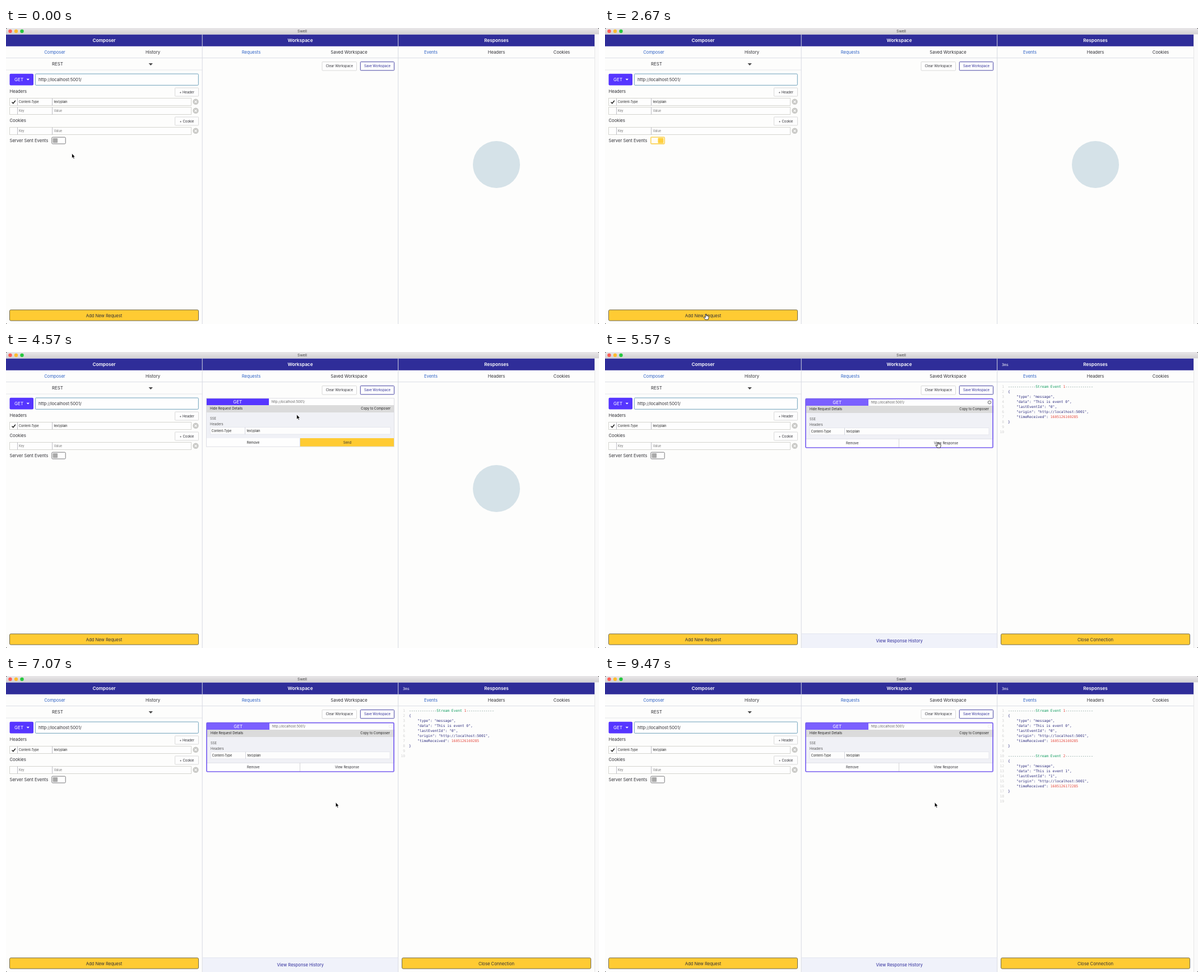
Recreate the animation shown at these times as an HTML page. Size 1058 by 529 pixels, loop 9540 ms.

```html
<!DOCTYPE html>
<html lang="en">
<head>
<meta charset="utf-8">
<title>Swell</title>
<style>
html, body { margin: 0; width: 100%; height: 100%; overflow: hidden; background: #fdfdfc; }
svg { display: block; width: 1058px; height: 529px; }
text { font-family: Inter, Roboto, sans-serif; white-space: pre; }
.code text { font-family: "DejaVu Sans Mono", monospace; }
</style>
</head>
<body>
<svg id="stage" viewBox="0 0 1058 529" xmlns="http://www.w3.org/2000/svg"></svg>
<script>
const LOOP = 9540;
const T = { toggle: 1400, add: 2700, expand: 4000, open: 5500, second: 8500, blur: 4000 };
const BODY = 7.65, SMALL = 5.95, CELL = 5.5, MONO = 6.31;
const INK = '#303036', NAVY = '#2f2d99', YELLOW = '#ffcb33', PURPLE = '#5636ff', GREY = '#d4d4cf';

const rect = (x, y, w, h, fill, stroke = 'none', r = 0, sw = 1) =>
  `<rect x="${x}" y="${y}" width="${w}" height="${h}" rx="${r}" fill="${fill}" stroke="${stroke}" stroke-width="${sw}"/>`;
const line = (x1, y1, x2, y2, stroke = '#dcdfe6') =>
  `<path d="M${x1} ${y1}L${x2} ${y2}" stroke="${stroke}"/>`;
// y is the middle of the capitals
const text = (s, x, y, size = BODY, fill = INK, anchor = 'start', weight = 400) =>
  `<text x="${x}" y="${y + size * 0.36}" font-size="${size}" fill="${fill}" text-anchor="${anchor}" font-weight="${weight}">${s}</text>`;
const mid = (s, x, y, size, fill, weight) => text(s, x, y, size, fill, 'middle', weight);
const group = (id, body, extra = '') => `<g id="${id}" ${extra}>${body}</g>`;

function frame() {
  const lights = ['#ff5f57', '#febc2e', '#28c840']
    .map((c, i) => `<circle cx="${7.5 + 10.5 * i}" cy="5.8" r="3.2" fill="${c}"/>`).join('');
  const heads = [['Composer', 175], ['Workspace', 525], ['Responses', 875]]
    .map(([s, x]) => mid(s, x, 22, 8.2, '#fff', 600)).join('');
  const tabs = [['Composer', 87, 1], ['History', 262], ['Requests', 437.5, 1], ['Saved Workspace', 612],
    ['Events', 758, 1], ['Headers', 875], ['Cookies', 991.5]]
    .map(([s, x, on]) => mid(s, x, 43.5, BODY, on ? '#2f63c6' : INK)).join('');
  return rect(0, 0, 1058, 529, '#fdfdfc') +
    rect(0, 0, 1058, 11.5, 'url(#bar)') + lights + mid('Swell', 528.5, 6, 6.7, '#444') +
    rect(0, 11.7, 1050, 21, NAVY) + heads + tabs +
    line(0, 53.5, 1050, 53.5) + line(0, 75, 350, 75, '#e4e6ea') +
    line(350.2, 11.5, 350.2, 529, '#d5d8e2') + line(699.7, 11.5, 699.7, 529, '#d5d8e2') +
    rect(1050, 11.5, 8, 517.5, '#fafafa') + line(1050.5, 11.5, 1050.5, 529, '#e6e6e6');
}

const smallButton = (s, y) =>
  rect(301.5, y, 42, 15, '#fdfdfd', '#dadada', 1) + mid(s, 322.5, y + 7.5, 6);

function row(y, key, value, checked) {
  const ink = checked ? '#222' : '#777';
  return rect(6.5, y, 324, 13, '#fefefe', GREY) +
    line(20.5, y, 20.5, y + 13, '#bdbdc4') + line(82.5, y, 82.5, y + 13, '#bdbdc4') +
    (checked ? `<path d="M10.6 ${y + 7}l2.2 2.2l4 -5" fill="none" stroke="#111" stroke-width="1.4"/>` : '') +
    text(key, 23, y + 6.6, CELL, ink) + text(value, 85.5, y + 6.6, CELL, ink) +
    `<circle cx="338.5" cy="${y + 6.3}" r="5.2" fill="#c9c9c6"/>` +
    `<path d="M336.5 ${y + 4.3}l4 4m0 -4l-4 4" stroke="#fff" stroke-width="1.1"/>`;
}

const bigButton = (s, x, w) =>
  rect(x, 503.8, w, 19.3, YELLOW, '#6f6a52', 2) + mid(s, x + w / 2, 514.3);

function composer() {
  return text('REST', 82, 64.5, 7.8) + '<path d="M254.5 63h7.4l-3.7 4z" fill="#4a4a4a"/>' +
    rect(6.5, 81.7, 42.5, 20.8, PURPLE, 'none', 2) + text('GET', 15, 92, 8.1, '#fff') +
    '<path d="M36.5 90.7h5.4l-2.7 2.9z" fill="#fff"/>' +
    rect(52.3, 82, 291, 20.3, '#fefefe', '#6da0bb', 1.5) + text('http://localhost:5001/', 58, 92) +
    text('Headers', 6.5, 113.5) + smallButton('+ Header', 107) +
    row(125.5, 'Content-Type', 'text/plain', true) +
    group('blankRow', row(141.5, 'Key', 'Value')) +
    group('lower',
      text('Cookies', 6.5, 165.5) + smallButton('+ Cookie', 159) + row(177.5, 'Key', 'Value') +
      text('Server Sent Events', 6.5, 201.3) +
      group('off', rect(81.8, 195.2, 24.4, 11.8, '#fefefe', '#77777a', 1.5) + rect(83.5, 197, 8.6, 8.2, '#a9a9a9', 'none', 1)) +
      group('on', rect(81.8, 195.2, 24.4, 11.8, '#fffdf4', '#fbd76a', 1.5, 1.8) + rect(94.5, 196.5, 9.8, 9.2, '#ffd03e', 'none', 1))) +
    bigButton('Add New Request', 6.5, 337) +
    group('focus', rect(6.3, 503.8, 337.4, 19.4, 'none', '#5c7fae', 2, 1.6));
}

const cardTop = (fill) =>
  rect(357, 83, 112, 12, fill) + mid('GET', 413.3, 89, 8.1, '#fff') +
  rect(469, 83, 223.5, 12, '#fefefe') + text('http://localhost:5001/', 473.5, 88.8, SMALL, '#666') +
  rect(357, 95, 335.5, 13, '#dbdbdb');

const cardButtons = (y, name, fill) =>
  rect(357, y, 335.5, 15, '#fefefe') + rect(524.5, y, 168, 15, fill) +
  line(524.5, y, 524.5, y + 15, '#d5d5d8') +
  mid('Remove', 441, y + 7.5, SMALL, '#222') + mid(name, 609, y + 7.5, SMALL, '#333');

const details = (inset) =>
  text('Hide Request Details', 364, 101.3, SMALL, '#222') +
  text('Copy to Composer', 686 - inset * 2, 101.3, SMALL, '#222', 'end') +
  rect(357, 108, 335.5, 46, '#f0f1f6') +
  text('SSE', 364, 119.2, SMALL, '#555') + text('Headers', 364, 128.8, SMALL, '#555') +
  rect(364.5, 134.5, 321.5 - inset * 2, 12.5, '#fdfdfd', '#e6e7ee') +
  line(426.5, 134.5, 426.5, 147, '#d5d6de') +
  text('Content-Type', 366.7, 140.8, CELL, '#222') + text('text/plain', 429.5, 140.8, CELL, '#222');

function workspace() {
  const edge = (h) => rect(357.5, 82.7, 335, h, 'none', '#dedee4');
  return rect(564, 60.5, 61.5, 15.5, '#fefefe', '#d8d8d8', 1) + mid('Clear Workspace', 594.8, 68.3, SMALL) +
    rect(632.3, 60.5, 60.2, 15.3, '#fefefe', '#4a48a6', 1) + mid('Save Workspace', 662.5, 68.3, SMALL, NAVY) +
    group('folded', cardTop(PURPLE) + text('View Request Details', 364, 101.3, SMALL, '#222') +
      cardButtons(108, 'Send', YELLOW) + edge(40.7)) +
    group('unfolded', cardTop(PURPLE) + details(0) + cardButtons(154, 'Send', YELLOW) + edge(86.5)) +
    group('live',
      `<g transform="translate(1 1)">${cardTop('#7b60ff') + details(1)}</g>` +
      rect(357.5, 155, 335, 16, '#fefefe') + line(358, 155.3, 692, 155.3, '#dedee6') +
      line(524.5, 155, 524.5, 171, '#d5d5d8') +
      mid('Remove', 441.3, 163, SMALL) + mid('View Response', 608.5, 163, SMALL) +
      '<circle id="pulse" cx="686" cy="90" r="2.8" fill="none" stroke="#63636b" stroke-width="1"/>' +
      rect(358, 83.7, 334, 87.3, 'none', '#785ff0', 1.5, 1.7) +
      rect(351, 503.5, 348, 25.5, '#f0f2fa') + line(351, 503.5, 699, 503.5, '#e3e6f0') +
      mid('View Response History', 525.2, 516.6, BODY, '#2f2d9c'));
}

const span = (s, fill) => `<tspan fill="${fill}">${s}</tspan>`;

function streamEvent(n, stamp) {
  const dash = span('-'.repeat(13), '#3f6a62'), red = '#e5473c';
  const body = [
    dash + span('Stream Event ', '#0c9a5c') + span(n + 1, red) + dash,
    '{',
    '    "type": "message",',
    `    "data": "This is event ${n}",`,
    `    "lastEventId": "${n}",`,
    '    "origin": "http://localhost:5001",',
    '    "timeReceived": ' + span(stamp, red),
    '}'
  ];
  return body.map((s, i) => text(s, 719, 61.3 + 9 * (i + 9 * n), MONO, '#29297c')).join('');
}

const lineNumbers = (from, to) => Array.from({ length: to - from + 1 }, (_, i) =>
  text(from + i, 712, 61.3 + 9 * (from + i - 1), MONO, '#d0d0d0', 'end')).join('');

function responses() {
  return group('logo', '<circle cx="875" cy="244" r="42" fill="#d5e2e8"/>') +
    group('result',
      text('3ms', 708, 22.3, 6.6, '#fff') + lineNumbers(1, 10) + streamEvent(0, 1605126169285) +
      group('more', lineNumbers(11, 19) + streamEvent(1, 1605126172285)), 'class="code"') +
    group('close', bigButton('Close Connection', 706.5, 337));
}

const pointer =
  group('arrow', '<path d="M0 0V8.6L1.9 6.9L3.2 9.9L4.7 9.3L3.4 6.4H5.8Z" fill="#000" stroke="#fff" stroke-width=".7"/>') +
  group('hand', '<path d="M-.9 .8q.9 -1.2 1.8 0V3.6q1 -.7 1.6 .1q1 -.4 1.5 .4q1.1 -.2 1.1 .9V7L4.2 10H-1.2L-3.8 6.3q-.4 -1.2 .9 -1l2 1.4Z" fill="#fff" stroke="#111" stroke-width=".8" stroke-linejoin="round"/>');

// dark corners outside the rounded window
const corners = '<path d="M0 0H1058V529H0ZM2.5 0Q0 0 0 2.5V526.5Q0 529 2.5 529H1055.5Q1058 529 1058 526.5V2.5Q1058 0 1055.5 0Z" fill="#222" fill-rule="evenodd"/>';

const stage = document.getElementById('stage');
stage.innerHTML =
  '<defs><linearGradient id="bar" x2="0" y2="1"><stop stop-color="#e9e7e9"/><stop offset="1" stop-color="#d2d0d2"/></linearGradient></defs>' +
  frame() + composer() + workspace() + responses() + corners + group('cursor', pointer);

// time, x, y of the pointer tip
const path = [
  [0, 117.5, 224], [500, 117.5, 224], [1200, 94, 205.2], [1750, 94, 205.2],
  [2500, 180, 511], [2850, 180, 511], [3430, 482.3, 190.7], [3850, 402, 101],
  [4150, 402, 101], [4570, 518.7, 111.7], [5050, 594, 161], [5600, 594, 161],
  [6230, 588.2, 212.2], [6600, 588.2, 225.7], [LOOP, 588.2, 225.7]
];

function pointerAt(t) {
  const i = Math.max(1, path.findIndex(k => k[0] > t));
  const [t0, x0, y0] = path[i - 1], [t1, x1, y1] = path[i];
  const u = (t - t0) / (t1 - t0), e = u * u * (3 - 2 * u);
  return [x0 + (x1 - x0) * e, y0 + (y1 - y0) * e];
}

function clickable(x, y, t) {
  const inside = (l, top, r, b) => x > l && x < r && y > top && y < b;
  const sent = t >= T.open, added = t >= T.add, lift = added ? 16 : 0;
  const bottom = t >= T.expand ? 154 : 108;
  return inside(81, 195 - lift, 107, 207 - lift) || inside(6, 503, 344, 524) ||
    (added && (inside(357, 95, 693, 108) || inside(357, bottom, 693, bottom + (sent ? 17 : 15))));
}

const el = (id) => document.getElementById(id);
const show = (id, on) => el(id).setAttribute('display', on ? 'inline' : 'none');

function draw(t) {
  const added = t >= T.add, open = t >= T.open;
  const on = t >= T.toggle && !added;
  show('blankRow', !added);
  el('lower').setAttribute('transform', `translate(0 ${added ? -16 : 0})`);
  show('on', on);
  show('off', !on);
  show('focus', added && t < T.blur);
  show('folded', added && t < T.expand);
  show('unfolded', t >= T.expand && !open);
  for (const id of ['live', 'result', 'close']) show(id, open);
  show('logo', !open);
  show('more', t >= T.second);

  const glow = 0.5 + 0.5 * Math.cos((t - 8050) / 2400 * 2 * Math.PI);
  el('pulse').setAttribute('opacity', glow.toFixed(3));

  const [x, y] = pointerAt(t), hand = clickable(x, y, t);
  el('cursor').setAttribute('transform', `translate(${x.toFixed(2)} ${y.toFixed(2)})`);
  show('hand', hand);
  show('arrow', !hand);
}

const start = performance.now();
function tick() {
  draw((performance.now() - start) % LOOP);
  requestAnimationFrame(tick);
}
tick();
</script>
</body>
</html>
```
